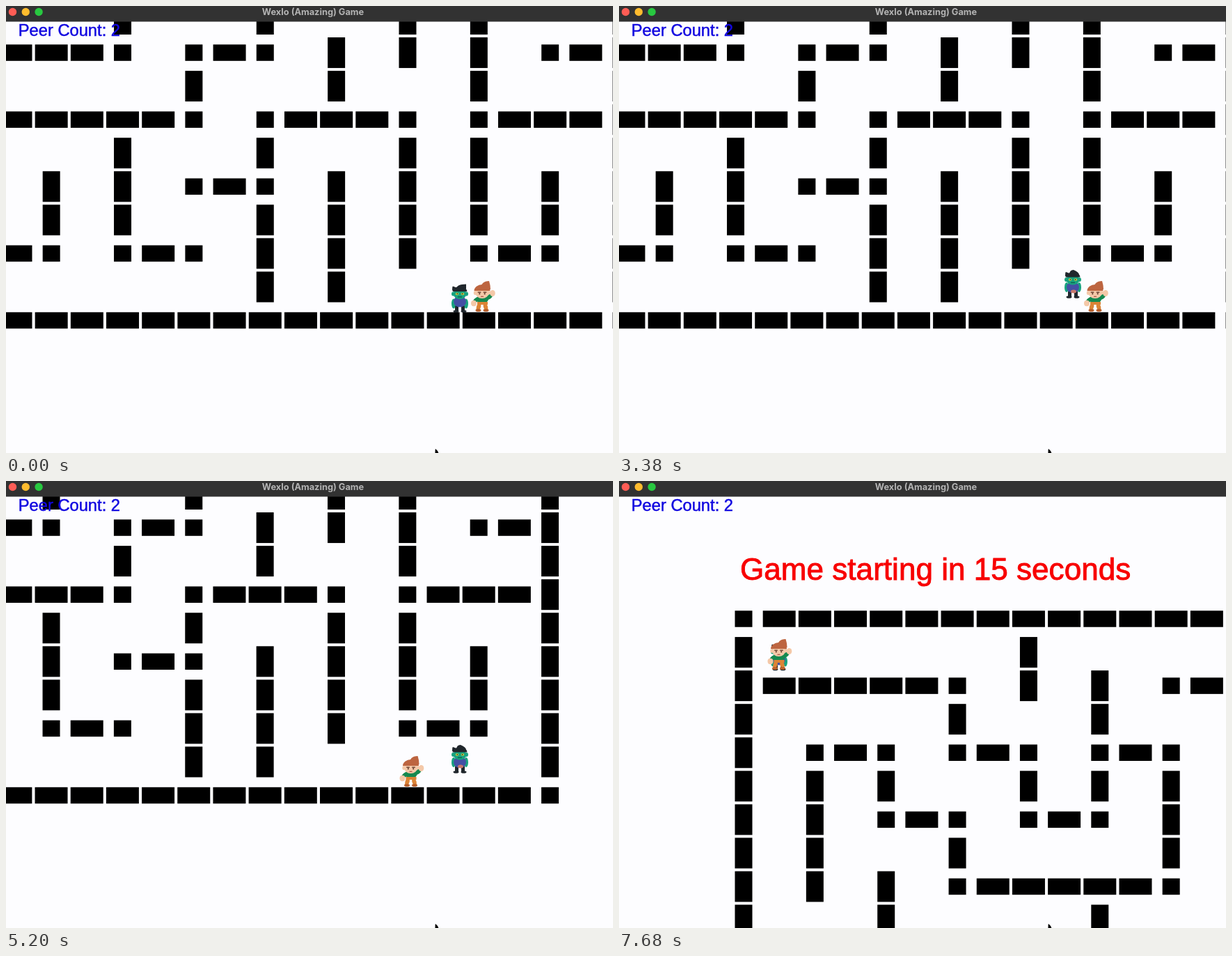
Animation of 872x642 px, one loop 8 s. Source, as an HTML page with a canvas:

```html
<!DOCTYPE html>
<html lang="en">
<head>
<meta charset="utf-8">
<title>Maze game</title>
<style>
html, body { margin: 0; width: 100%; height: 100%; overflow: hidden; background: #fdfdff; }
canvas { display: block; }
</style>
</head>
<body>
<canvas id="stage" width="872" height="642"></canvas>
<script>
const ctx = document.getElementById('stage').getContext('2d');
const LOOP = 8000, NEW_MAZE = 5580, LOBBY = 5600;
const PITCH_X = 51.18, PITCH_Y = 48.06, LONG_X = 47, LONG_Y = 44, THIN_X = 25, THIN_Y = 23.5;
const STEP_X = 26.7, STEP_Y = 20.5, STEP_TIME = 290;
const SANS = '"Liberation Sans", Arial, sans-serif';

// Maps of the walls: - lying brick, | standing brick, + corner
const firstMaze = `
...|...|...|.|...|
---+.+-+.|.|.|.+-|
.....|...|...|...|
-----+.+---+.+---|
...|...|...|.|...|
.|.|.+-+.|.|.|.|.|
.|.|...|.|.|.|.|.|
-+.+-+.|.|.|.+-+.|
.......|.|.......|
-----------------+`;
const secondMaze = `
...|...|.|.|.|...|
...|.+---+.|.+-+.|
...|.|...|...|...|
...|.|.|.|.+-+.|.|
...|.|.|.|...|.|.|
...|.|.|.+---+.|.|
...|...|.......|.|
..-------------+.|
.................|
..---------------+`;
const lobbyMaze = `
+-------------
|.......|.....
|-----+.|.|.+-
|.....|...|...
|.+-+.+-+.+-+.
|.|.|...|.|.|.
|.|.+-+.+-+.|.
|.|...|.....|.
|.|.|.+-----+.
|...|.....|...`;

// Key presses made since a walk began, at most `limit`
const steps = (t, start, limit) =>
  Math.max(0, Math.min(limit, Math.floor((t - start) / STEP_TIME)));

function box(color, cx, cy, w, h) {
  ctx.fillStyle = color;
  ctx.fillRect(cx - w / 2, cy - h / 2, w, h);
}
function oval(color, cx, cy, rx, ry = rx, tilt = 0, from = 0, to = 2 * Math.PI) {
  ctx.fillStyle = color;
  ctx.beginPath();
  ctx.ellipse(cx, cy, rx, ry, tilt, from, to);
  ctx.fill();
}
// Upper half of an oval
const cap = (color, cx, cy, rx, ry) => oval(color, cx, cy, rx, ry, 0, Math.PI, 2 * Math.PI);
// Tuft of hair bending from its root to a tip
function tuft(color, x, y, half, tipX, tipY) {
  ctx.fillStyle = color;
  ctx.beginPath();
  ctx.moveTo(x - half, y);
  ctx.quadraticCurveTo(x - half, tipY, tipX, tipY);
  ctx.quadraticCurveTo(x + half, (y + tipY) / 2, x + half, y);
  ctx.fill();
}
function label(text, x, y, font, color, weight = 0, align = 'left') {
  ctx.font = font;
  ctx.fillStyle = ctx.strokeStyle = color;
  ctx.textAlign = align;
  ctx.fillText(text, x, y);
  if (weight) {
    ctx.lineWidth = weight;
    ctx.strokeText(text, x, y);
  }
}
function at(x, y, paint) {
  ctx.save();
  ctx.translate(x, y);
  paint();
  ctx.restore();
}
const bothSides = paint => [-1, 1].forEach(paint);

function drawMaze(map, x, y) {
  map.trim().split('\n').forEach((row, r) => [...row].forEach((kind, c) => {
    if (kind === '.') return;
    box('#000', x + c * PITCH_X, y + r * PITCH_Y,
      kind === '-' ? LONG_X : THIN_X, kind === '|' ? LONG_Y : THIN_Y);
  }));
}

function drawZombie(upright) {
  const skin = '#18a27f', dark = '#20262c', jacket = '#4450a4';
  bothSides(side => {
    box(dark, side * 4.5, 15, 5, 9);
    oval(dark, side * 5.5, 19, 4, 1.8);
    oval(skin, side * 9, upright ? 5 : 8, 3, 7);
    oval(skin, side * 9.5, -6, 2.5, 3);
  });
  oval(jacket, 0, 5, 9, 8);
  if (upright) oval('#c9796c', 1, 11, 4, 2.5);
  oval(skin, 0, -6, 9.5, 7.5);
  cap(dark, 0, -9.5, 10.5, 7);
  tuft(dark, -6, -11, 5, -10, -17);
  tuft(dark, 2, -13, 7, upright ? 1 : 9, -20);
  bothSides(side => {
    oval('#d8d440', side * 4, -6, 2.2, 1.8);
    oval(dark, side * 3.7, -6.2, 0.9);
  });
  box('#0c5b4d', 0, -1.7, 6, 1.2);
}

function drawHero() {
  const skin = '#f4c8a8', hair = '#bd6540', tunic = '#16894f', trousers = '#dc8436', shade = '#5a3022';
  bothSides(side => {
    oval(trousers, side * 5 - 1, 15, 3, 6, side * -0.3);
    oval('#b9602c', side * 5.5 - 1, 20, 4, 2);
    oval(skin, side * 10 - 1, -5, 2.2, 3);
  });
  oval(tunic, -9, 5, 6, 3, -0.6);
  oval(tunic, 9, 1, 6, 3, -0.6);
  oval(tunic, -0.5, 4, 8.5, 6.5);
  box(trousers, -0.5, 10, 15, 4);
  oval(skin, -13, 10, 4, 4.2);
  oval(skin, 14, -4.5, 3.8, 4.5);
  oval(skin, -1, -5, 9.5, 8);
  cap(hair, -1, -8, 11.5, 9);
  tuft(hair, 4, -10, 7, 9, -22);
  bothSides(side => {
    box(shade, side * 4 - 1, -5.8, 4.5, 1.3);
    oval(shade, side * 3.7 - 1, -3.7, 1.1);
  });
  box('#a65343', -1, 0.3, 4, 1.2);
}

function drawWindow() {
  box('#323232', 436, 11.25, 872, 22.5);
  ['#ff5d55', '#febc2e', '#28c840'].forEach((color, i) => oval(color, 9.5 + i * 18.8, 8.5, 5.7));
  label('Wexlo (Amazing) Game', 441, 12.5, 'bold 12.8px Inter, sans-serif', '#b4b4b4', 0, 'center');
  tuft('#000', 619, 643, 2.5, 617, 636);
}

function drawGame(t) {
  const camera = Math.max(0, steps(t, 4000, 5) * STEP_X - 4.3);
  const started = t < NEW_MAZE;
  drawMaze(started ? firstMaze : secondMaze, 14 - camera, 19);
  if (!started) return;
  const left = steps(t, 420, 2) - steps(t, 1500, 2);
  const up = steps(t, 2400, 1);
  at(652 - left * STEP_X, 419.5 - up * STEP_Y, () => drawZombie(up));
  at(685 - camera, 417, drawHero);
}

function drawLobby() {
  drawMaze(lobbyMaze, 179, 198);
  at(230, 251.5, () => drawZombie(false));
  at(230.5, 249, drawHero);
  label('Game starting in 15 seconds', 174, 142, '44.1px ' + SANS, '#f80000', 0.9);
}

function draw(now) {
  const t = now % LOOP;
  box('#fdfdff', 436, 321, 872, 642);
  if (t < LOBBY) drawGame(t);
  else drawLobby();
  label('Peer Count: 2', 17.8, 43, '23.7px ' + SANS, '#1208e0', 0.5);
  drawWindow();
  requestAnimationFrame(draw);
}
requestAnimationFrame(draw);
</script>
</body>
</html>
```
